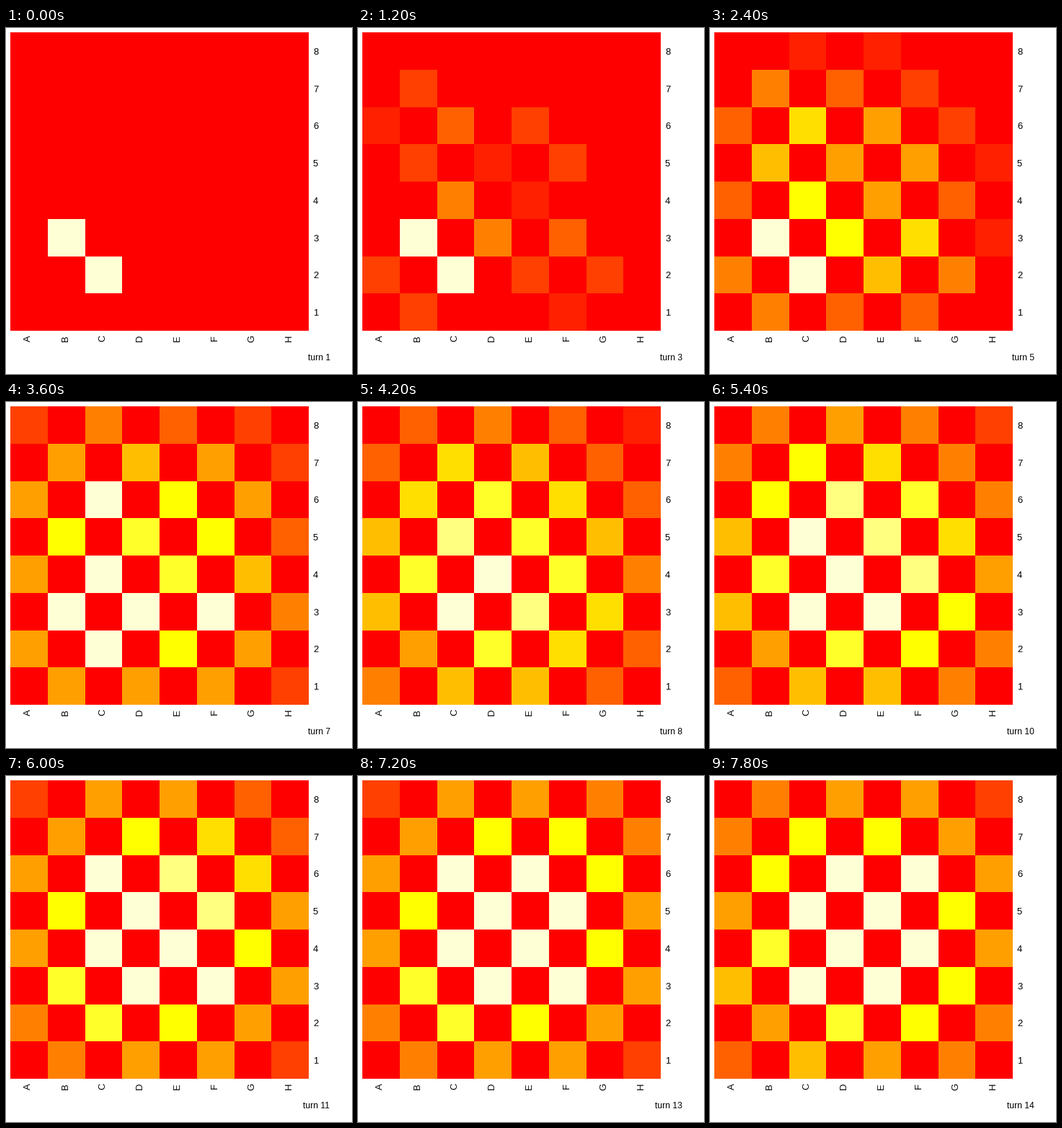
These frames come from a looping animation (480x480 px, 8 s). A matplotlib script:

```python
import numpy as np
import matplotlib.pyplot as plt
from matplotlib.animation import FuncAnimation
from matplotlib.colors import ListedColormap

SIZE, DPI = 480, 80
N, LEFT, CELL = 8, 6, 51.75
LEVELS, TURNS = 12, 14
STEP_MS, FRAMES_PER_TURN, FRAMES = 200, 3, 40
JUMPS = [(1, 2), (2, 1), (2, -1), (1, -2), (-1, -2), (-2, -1), (-2, 1), (-1, 2)]


def heat_colors():
    """Red to yellow in nine steps, then three paler yellows."""
    warm = [(255, int(255 * k / 8 + 0.5), 0) for k in range(9)]
    pale = [(255, 255, b) for b in (42, 128, 213)]
    return ListedColormap(np.array(warm + pale) / 255)


def knight_moves(row, col):
    return [(row + dr, col + dc) for dr, dc in JUMPS
            if 0 <= row + dr < N and 0 <= col + dc < N]


def step(prob):
    """Spread each square's probability evenly over its knight moves."""
    out = np.zeros((N, N))
    for row, col in np.ndindex(N, N):
        moves = knight_moves(row, col)
        for target in moves:
            out[target] += prob[row, col] / len(moves)
    return out


def to_levels(prob):
    scaled = prob / prob.max()
    return np.floor((LEVELS - 1e-5) * scaled + 1e-7)


def walk():
    prob = np.zeros((N, N))
    prob[0, 0] = 1
    boards = []
    for _ in range(TURNS):
        prob = step(prob)
        boards.append(to_levels(prob))
    return boards


boards = walk()

fig = plt.figure(figsize=(SIZE / DPI, SIZE / DPI), dpi=DPI, facecolor="white")
ax = fig.add_axes([0, 0, 1, 1])
ax.set_xlim(0, SIZE)
ax.set_ylim(SIZE, 0)
ax.axis("off")


def label(x, y, text, px, **kw):
    return ax.text(x, y, text, fontsize=px * 72 / DPI, color="black",
                   family="Liberation Sans", **kw)


edges = np.floor(LEFT + CELL * np.arange(N + 1) + 0.5)
mesh = ax.pcolormesh(edges, edges, boards[0][::-1], cmap=heat_colors(),
                     vmin=-0.5, vmax=LEVELS - 0.5, antialiased=False,
                     edgecolors="none", linewidth=0)

for k in range(N):
    middle = LEFT + CELL * (k + 0.5)
    label(426, round(middle + 5), str(N - k), 13, va="baseline")
    label(round(middle + 5), 430.5, "ABCDEFGH"[k], 13, rotation=90,
          ha="right", va="center")

caption = label(419, 461, "turn 1", 12, va="baseline")


def draw(i):
    turn = i // FRAMES_PER_TURN + 1
    mesh.set_array(boards[turn - 1][::-1])
    caption.set_text(f"turn {turn}")
    caption.set_x(419 if turn < 10 else 412)
    return mesh, caption


anim = FuncAnimation(fig, draw, frames=FRAMES, interval=STEP_MS,
                     repeat=True, repeat_delay=0)
plt.show()
```
